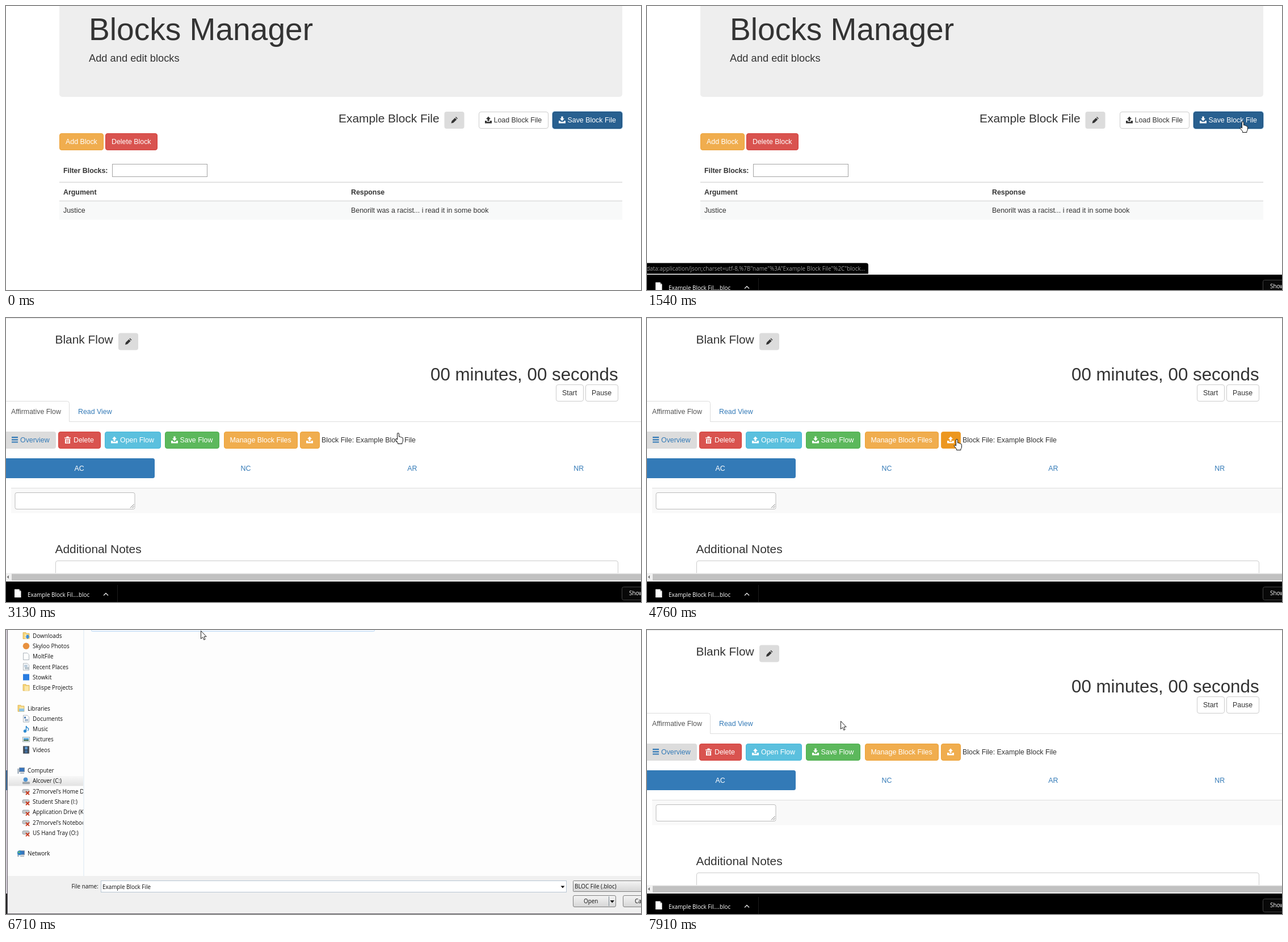
An HTML page that plays this animation: 1119x500 px, repeating every 7.99 s.

```html
<!DOCTYPE html>
<html lang="en">
<head>
<meta charset="utf-8">
<title>Blocks Manager</title>
<style>
  html, body { margin: 0; width: 100%; height: 100%; overflow: hidden; background: #fff; }
  svg { display: block; width: 1119px; height: 500px; }
  text { font: 12.4px "Liberation Sans", Arial, sans-serif; fill: #333; white-space: pre; }
  .ui { font: 9.9px "Open Sans", "Noto Sans", sans-serif; fill: #111; }
</style>
</head>
<body>
<svg id="stage" viewBox="0 0 1119 500"></svg>
<script>
const LOOP = 7990;

// Drawing helpers
const rect = (x, y, w, h, fill, extra = "") =>
  `<rect x="${x}" y="${y}" width="${w}" height="${h}" fill="${fill}" ${extra}/>`;
const path = (d, fill, extra = "") => `<path d="${d}" fill="${fill}" ${extra}/>`;
const circle = (x, y, r, fill, extra = "") =>
  `<circle cx="${x}" cy="${y}" r="${r}" fill="${fill}" ${extra}/>`;
const text = (x, y, s, style = "", extra = "") =>
  `<text x="${x}" y="${y}" style="${style}" ${extra}>${s}</text>`;
const ui = (x, y, s, style = "", extra = "") => text(x, y, s, style, `class="ui" ${extra}`);
const group = (id, body) => `<g id="${id}">${body}</g>`;
const at = (x, y, body) => `<g transform="translate(${x} ${y})">${body}</g>`;
const box = (x, y, w, h, fill, border, r = 3.5, extra = "") =>
  rect(x + .5, y + .5, w - 1, h - 1, fill, `stroke="${border}" rx="${r}" ${extra}`);

const TRAY = "M0 7.5h3v1.7h6V7.5h3V12H0z ";
const GLYPHS = {
  up: TRAY + "M6 0l4 4.4H7.6V8H4.4V4.4H2z",
  down: TRAY + "M4.4 0h3.2v3.5H10L6 8 2 3.5h2.4z",
  pencil: "M0 11.5l1-4 5.6-5.6 3 3L4 10.5z M7.5 1l1-1 3 3-1 1z",
  list: "M0 0h11v2.2H0z M0 4.2h11v2.2H0z M0 8.4h11v2.2H0z",
  trash: "M0 2h3.5V0h4v2H11v1.5H0z M1 4.5h9v8H1z M3 5.5v6h1v-6z M5 5.5v6h1v-6z M7 5.5v6h1v-6z"
};
const glyph = (name, x, y, fill) =>
  at(x, y, path(GLYPHS[name], fill, 'fill-rule="evenodd"'));

function button(x, y, w, label, textX, fill, border, color = "#fff", icon, id = "") {
  return box(x, y, w, 30, fill, border, 3.5, id && `id="${id}"`) +
    (icon ? glyph(icon, x + 11, y + 8.5, color) : "") +
    (label ? text(textX, y + 19.3, label, `fill:${color}`) : "");
}
const pencilButton = (x, y) =>
  rect(x, y, 35, 30, "#dcdcdc", 'rx="4"') + glyph("pencil", x + 12, y + 9, "#333");

const ORANGE = ["#f0ad4e", "#eea236"], RED = ["#d9534f", "#d43f3a"], PLAIN = ["#fff", "#ccc"];
const BOLD = "font-weight:bold", HEADING = "font-size:20.9px";

function managerPage() {
  return rect(0, 0, 1119, 500, "#fff") +
    rect(94, -10, 992, 170, "#eee", 'rx="5"') +
    text(146, 60, "Blocks Manager", "font-size:55.1px") +
    text(146, 98, "Add and edit blocks", "font-size:18.3px") +
    text(586, 204.5, "Example Block File", HEADING) +
    pencilButton(772.5, 186) +
    button(833, 186, 123, "Load Block File", 859.5, ...PLAIN, "#333", "up") +
    rect(962, 185, 125, 32, "#a9cdec", 'rx="5"') +
    button(963, 186, 123, "Save Block File", 989.5, "#286090", "#204d74", "#fff", "down") +
    button(94, 224, 78, "Add Block", 105, ...ORANGE) +
    button(175, 224, 92, "Delete Block", 186, ...RED) +
    text(101, 294, "Filter Blocks:", BOLD) +
    box(187, 278, 168, 23, "#fff", "#a4a4a4", 0) +
    rect(94, 309.5, 992, 1.7, "#ddd") +
    text(101, 331.5, "Argument", BOLD) +
    text(608, 331.5, "Response", BOLD) +
    rect(94, 342.5, 992, 1.8, "#ddd") +
    rect(94, 344.3, 992, 32, "#f8f9f9") +
    text(101, 364.3, "Justice") +
    text(608, 364.3, "Benorilt was a racist... i read it in some book");
}

function flowPage() {
  const blue = "#337ab7";
  const pills = ["AC", "NC", "AR", "NR"].map((s, i) =>
    text(129 + i * 293.4, 268.8, s, `fill:${i ? blue : "#fff"};text-anchor:middle`)).join("");
  return rect(0, 0, 1119, 500, "#fff") + rect(0, 0, 1119, 1, "#e4e4e4") +
    text(86.5, 45.3, "Blank Flow", HEADING) +
    pencilButton(198, 26.5) +
    text(748, 110, "00 minutes, 00 seconds", "font-size:31.3px") +
    button(969, 117, 49, "Start", 980, ...PLAIN, "#333") +
    button(1021, 117, 58, "Pause", 1032, ...PLAIN, "#333") +
    path("M-5 146.5H107.5Q111.5 146.5 111.5 150.5V182.5H1119", "none", 'stroke="#ddd"') +
    text(9, 168.5, "Affirmative Flow", "fill:#555") +
    text(127, 168.5, "Read View", `fill:${blue}`) +
    rect(-8, 200, 96, 30, "#dcdcdc", 'rx="4"') + glyph("list", 10, 209, blue) +
    text(25, 219.3, "Overview", `fill:${blue}`) +
    button(92, 200, 75, "Delete", 119, ...RED, "#fff", "trash") +
    button(174, 200, 99, "Open Flow", 201, "#5bc0de", "#46b8da", "#fff", "up") +
    button(280, 200, 96, "Save Flow", 306.5, "#5cb85c", "#4cae4c", "#fff", "down") +
    button(384, 200, 130, "Manage Block Files", 394.5, ...ORANGE) +
    button(518, 200, 35, "", 0, ...ORANGE, "#fff", "up", "pick") +
    text(556, 218.5, "Block File: Example Block File") +
    rect(-8, 247, 270, 35, blue, 'rx="3.5"') + pills +
    rect(9, 299, 1110, 1, "#ddd") + rect(9, 300, 1110, 43.5, "#f9f9f9") +
    box(15.5, 307, 212, 30, "#fff", "#bbb", 3) +
    path("M219 334.5l6.5-6.5 M222.5 334.5l3-3", "none", 'stroke="#777"') +
    text(86.5, 414, "Additional Notes", HEADING) +
    box(87, 427, 992, 40, "#fff", "#ccc") +
    rect(0, 449, 1119, 15, "#f1f1f1") + rect(10, 450.5, 1109, 11.5, "#c1c1c1") +
    path("M5 453v6l-3.5-3z", "#777");
}

const shelf = () =>
  rect(0, 464, 1119, 80, "#000") + rect(196, 470, 1, 30, "#1c1c1c") +
  path("M15 477.5h8l3.5 3.5v11H15z", "#fff") + path("M23 477.5v3.5h3.5z", "#aaa") +
  circle(20, 485, 10.8, "none", 'id="ring" stroke="#b5474a" stroke-width="1.6"') +
  ui(38, 490.5, "Example Block Fil....bloc", "fill:#fff") +
  path("M172 488.5l4-4 4 4", "none", 'stroke="#ddd" stroke-width="1.5"') +
  box(1085, 473, 150, 24, "#080808", "#444", 3) +
  ui(1098, 488, "Show all downloads...", "fill:#fff");

// Link label: scheme, type and the escaped start of the saved file
function linkLabel() {
  const saved = '{"name":"Example Block File","block';
  const escaped = saved.replace(/[{:,]/g, encodeURIComponent);
  return ["data", ["application/json;charset=utf-8", escaped].join()].join(":") + "...";
}

const statusBar = () =>
  rect(390, 446, 196, 18, "#e1e1e1", 'id="stretch"') +
  path("M0 445H386Q390 445 390 449V464H0z", "#000") +
  ui(-1, 458, linkLabel(), "fill:#999");

// Small sidebar icons, each in a 13 px square
const FOLDER = path("M1 1h5l1 1.5h5V12H1z", "#f5d47a", 'stroke="#d9a93c" stroke-width=".7"') +
  rect(4, 4, 7, 8, "#fbe7a8");
const PAPER = path("M1.5 .5h7l3 3v9h-10z", "#fff", 'stroke="#9aa3ab" stroke-width=".8"');
const SCREEN = box(3, 1, 10, 8, "#3774bd", "#8894a0", 0) + rect(0, 3, 3, 9, "#aebac6") +
  rect(5, 10, 7, 2, "#b0b8c0");
const ICONS = {
  folder: FOLDER,
  paper: PAPER,
  download: FOLDER + path("M7 5h4v3h2l-4 4.5L5 8h2z", "#3b8ede"),
  disc: circle(6.5, 6.5, 5.8, "#e8913f"),
  square: rect(1, 1, 11, 11, "#2a7de1"),
  places: PAPER + rect(3, 3, 6, 4, "#b9cbdb") + path("M4 8h7 M4 10h7", "none", 'stroke="#78909f"'),
  library: FOLDER + rect(3, 7, 9, 5, "#8cc3e8"),
  doc: PAPER + rect(3, 3, 3, 3, "#4478b0") + path("M4 8h6 M4 10h6", "none", 'stroke="#5b7ea6"'),
  music: circle(4.5, 10, 2.7, "#2f8bd0") + path("M6.5 10V1q1 3 4 4.5q1 2-1 4", "none", 'stroke="#2f8bd0" stroke-width="1.5"'),
  picture: box(0, 2, 13, 9, "#fff", "#9aa", 0) + rect(2, 4, 9, 3, "#58a9e0") + rect(2, 7, 9, 2, "#315f3c"),
  video: rect(1, 0, 11, 13, "#27313c") + rect(4, 1, 5, 5, "#5e9ad0") + rect(4, 7, 5, 5, "#456f9c") +
    path("M2.2 1v11 M10.8 1v11", "none", 'stroke="#ddd" stroke-dasharray="1 1"'),
  computer: SCREEN,
  disk: rect(0, 8, 13, 4, "#9da4aa", 'rx="1"') + circle(5.5, 4, 3.8, "#4d93d1"),
  lost: rect(0, 3, 12, 6, "#c5cacd", 'rx="2" stroke="#858b90" stroke-width=".7"') +
    path("M6 6.5l6 6 M12 6.5l-6 6", "none", 'stroke="#c8391d" stroke-width="2"'),
  network: SCREEN + circle(4, 5, 4, "#2d83c9") + circle(3, 4, 1.6, "#6fc06a")
};

// Blocks of icon and label; a leading "-" marks a heading, an empty line a gap
const SIDEBAR = `download Downloads
disc Skyloo Photos
paper MoltFile
places Recent Places
square Stowkit
folder Eclispe Projects

-library Libraries
doc Documents
music Music
picture Pictures
video Videos

-computer Computer
disk Alcover (C:)
lost 27morvel's Home Drive
lost Student Share (I:)
lost Application Drive (K:)
lost 27morvel's Notebook
lost US Hand Tray (O:)

-network Network`;

function sidebar() {
  return SIDEBAR.split("\n").map((line, row) => {
    if (!line) return "";
    const [, head, icon, label] = line.match(/^(-?)(\w+) (.*)$/);
    const x = head ? 20 : 29, y = 10 + row * 18.27;
    return at(x, y - 6.5, ICONS[icon]) + ui(x + 18, y + 3.7, label);
  }).join("");
}

const gradient = (id, from, to) =>
  `<linearGradient id="${id}" x2="0" y2="1"><stop stop-color="${from}"/><stop offset="1" stop-color="${to}"/></linearGradient>`;

function dialog() {
  return `<defs><clipPath id="side">${rect(0, 0, 136, 433, "#000")}</clipPath>` +
    gradient("grey", "#f4f4f4", "#d6d6d6") + gradient("pale", "#f8f8f8", "#e2e2e2") + "</defs>" +
    rect(0, 0, 1119, 500, "#fdfdfd") +
    rect(4, 257, 132, 17.5, "url(#pale)") +
    `<g clip-path="url(#side)">${sidebar()}</g>` +
    rect(136.5, 0, 1, 433, "#d9e7f2") +
    rect(3, 433, 1116, 67, "#f0f0f0") +
    rect(0, 0, 2, 500, "#d9d2dc") + rect(0, 247, 2, 35, "#3f6c99") + rect(0, 464, 2, 36, "#222") +
    rect(2, 0, 1, 500, "#65616a") + rect(2, 499, 1117, 1, "#65616a") +
    box(150, -18, 500, 21, "#f3f8fd", "#bcd9f5", 2, 'id="row"') +
    ui(115.5, 455, "File name:") +
    box(167, 441, 821, 21, "#fff", "#b8c6d3", 0) +
    rect(170, 445, 86, 14, "#3399ff", 'id="mark"') +
    ui(170, 455.5, "Example Block File", "", 'id="fileName"') +
    rect(255.5, 445, 1, 13, "#000", 'id="caret"') +
    path("M977.5 450.5h7l-3.5 4z", "#111") +
    box(999, 441, 160, 20, "url(#grey)", "#808080", 1) +
    ui(1002, 455, "BLOC File (.bloc)") +
    box(999, 467, 76, 21, "url(#grey)", "#808080", 2.5) +
    group("glow", box(999, 467, 76, 21, "none", "#3c7fb1", 2.5) + box(1000, 468, 74, 19, "none", "#48c9f3", 2)) +
    rect(1062, 469, 1, 17, "#7c8a94") +
    ui(1018, 481, "Open") + path("M1064.5 476h7.5l-3.7 4.5z", "#111") +
    box(1087, 467, 76, 21, "url(#grey)", "#808080", 2.5) +
    ui(1108, 481, "Cancel");
}

const arrow = path("M.5 .5v14l3.2-3 2.1 4.8 2.2-1-2-4.6h4.2z", "#fff", 'id="arrow" stroke="#222"');
const hand = path("M-1.5 11V1q0-1.5 1.5-1.5t1.5 1.5v5q2.3-1 2.7 .8 1.8-.8 2.2 .9 2.1-.5 2.1 1.6V13q0 2-1.5 3.5v2H-.5v-2l-4.1-5q-.4-2 1.4-1.8z",
  "#fff", 'id="hand" stroke="#111"');

const stage = document.getElementById("stage");
stage.innerHTML = group("manager", managerPage()) + group("flow", flowPage()) +
  group("status", statusBar()) + group("shelf", shelf()) + group("dialog", dialog()) +
  group("cursor", arrow + hand);

const part = id => document.getElementById(id);
const show = (id, on) => part(id).setAttribute("visibility", on ? "inherit" : "hidden");
const shift = (id, x, y) => part(id).setAttribute("transform", `translate(${x} ${y})`);

// Pointer moves: first step, last step, number of steps, end point
const MOVES = [
  [530, 1010, 7, 1050, 204], [2310, 2460, 3, 977, 186], [2750, 2910, 3, 722, 205],
  [3050, 3130, 2, 691, 203], [3210, 3280, 2, 598, 214], [3510, 4140, 9, 546, 214],
  [5220, 5530, 5, 430, 62], [5690, 6080, 6, 355, -20], [6500, 6710, 3, 343, 1],
  [7230, 7760, 8, 382, 132], [7910, 7910, 1, 341, 160]
];

// Share of a stepped change that is done at time t
function progress(t, start, end, steps) {
  if (t < start) return 0;
  if (t >= end) return 1;
  return (Math.floor((t - start) / (end - start) * (steps - 1)) + 1) / steps;
}

function pointer(t) {
  let x = 1094, y = 515;
  for (const [start, end, steps, toX, toY] of MOVES) {
    const k = progress(t, start, end, steps);
    x += (toX - x) * k;
    y += (toY - y) * k;
    if (k < 1) break;
  }
  return [x, y];
}

function draw(t) {
  const onFlow = t >= 2310, picking = t >= 4840 && t < 7160;
  const rise = progress(t, 1370, 1610, 4);
  const [x, y] = pointer(t);

  show("manager", !onFlow);
  show("flow", onFlow);
  show("status", t >= 1090 && !onFlow);
  shift("status", 0, 30 * (1 - rise));
  show("stretch", t >= 2230 && !onFlow);
  show("shelf", rise > 0);
  shift("shelf", 0, 36 * (1 - rise));
  show("ring", t >= 1610 && t < 2460);

  const over = x >= 518 && x < 553 && t >= 3510 && t < 4840;
  part("pick").setAttribute("fill", over ? "#ec971f" : ORANGE[0]);

  const focused = t < 6000;
  show("dialog", picking);
  show("mark", picking && focused);
  show("glow", picking && focused);
  show("caret", picking && t >= 5300 && t < 5690);
  show("row", picking && t >= 6500);
  part("fileName").style.fill = focused ? "#fff" : "#111";

  const pointing = t >= 1010 && t < 4840;
  show("arrow", !pointing);
  show("hand", pointing);
  shift("cursor", x, y);
}

const begin = performance.now();
function tick() {
  draw((performance.now() - begin) % LOOP);
  requestAnimationFrame(tick);
}
tick();
</script>
</body>
</html>
```
